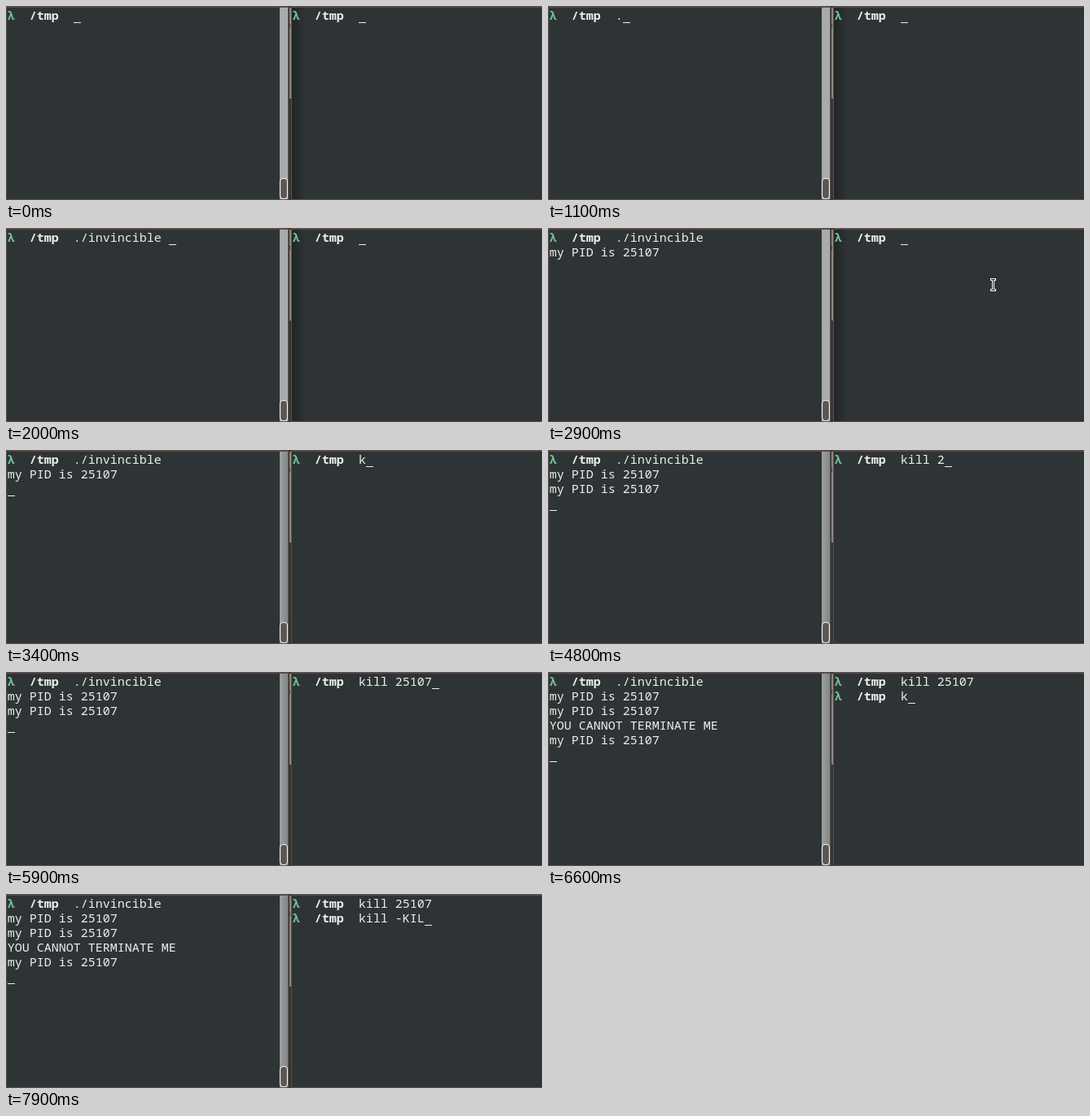
These frames come from a looping animation (658 px wide and 239 px high, 8 s). An HTML page:

```html
<!DOCTYPE html>
<html lang="en">
<head>
<meta charset="utf-8">
<title>Two terminals</title>
<style>
html, body { margin: 0; width: 100%; height: 100%; overflow: hidden; background: #2e3436; }
svg { display: block; }
text { font: 15px "Noto Sans Mono", "DejaVu Sans Mono", monospace; fill: #eeeeec; white-space: pre; }
.bold { font-weight: 700; }
.sign { fill: #73c48f; }
</style>
</head>
<body>
<svg width="658" height="239" viewBox="0 0 658 239">
  <defs>
    <linearGradient id="toRight"><stop stop-opacity=".3"/><stop offset="1" stop-opacity="0"/></linearGradient>
    <linearGradient id="toLeft"><stop stop-color="#1c282c" stop-opacity="0"/><stop offset="1" stop-color="#1c282c" stop-opacity=".3"/></linearGradient>
  </defs>
  <rect width="658" height="239" fill="#2e3436"/>
  <rect x="336" y="2" width="10" height="236" fill="#a8abab"/>
  <rect id="leftShade" x="332" y="2" width="15" height="236" fill="url(#toLeft)"/>
  <rect id="rightShade" x="351" y="2" width="17" height="236" fill="url(#toRight)"/>
  <rect x="336.5" y="212.5" width="9" height="25" rx="4" fill="#5e5653" stroke="#f2f2f0" stroke-width="1.2"/>
  <rect x="346" width="5" height="239" fill="#363534"/>
  <rect x="348" y="2" width="2" height="112" fill="#8f8581"/>
  <rect x="348" y="22" width="1" height="5" fill="#5a5350"/>
  <path d="M0 1H347M350 1H658" stroke="#5a4c48" stroke-width="2"/>
  <path d="M.5 0V239M346.5 0V239M350.5 0V239M0 238.5H347M350 238.5H658" stroke="#5a4f4b"/>
  <g id="left" transform="translate(2)"></g>
  <g id="right" transform="translate(352)"></g>
  <g id="pointer" fill="none">
    <path d="M-3.5-6.5H3.5M-3.5 6.5H3.5M0-6V6" stroke="#fff" stroke-width="3"/>
    <path d="M-2.5-6.5H2.5M-2.5 6.5H2.5M0-6V6" stroke="#222"/>
  </g>
</svg>
<script>
const LOOP = 8000, STEP = 100, CELL = 9, ROW = 18, BLINK = 600;
const FOCUS = 3000, KILLED = 6000;
const $ = id => document.getElementById(id);

// Each entry: time of a key press and the command line after it
const run = [[0, ""], [1000, "."], [1200, "./"], [1400, "./i"], [1500, "./in"], [1800, "./invincible "]];
const enter = 2100;
const kill = [[0, ""], [3300, "k"], [3700, "ki"], [3800, "kil"], [3900, "kill"], [4100, "kill "],
  [4400, "kill 2"], [4900, "kill 25"], [5200, "kill 251"], [5500, "kill 2510"], [5700, "kill 25107"]];
const force = [[KILLED, ""], [6400, "k"], [6800, "ki"], [6900, "kil"], [7100, "kill"], [7200, "kill "],
  [7400, "kill -"], [7600, "kill -K"], [7700, "kill -KI"], [7900, "kill -KIL"]];
const output = [[enter, "my PID is 25107"], [4000, "my PID is 25107"],
  [KILLED, "YOU CANNOT TERMINATE ME"], [KILLED, "my PID is 25107"]];

const until = (list, t) => list.filter(([at]) => at <= t);
const typed = (keys, t) => "λ  /tmp  " + until(keys, t).pop()[1];

function draw(id, lines, cursorOn) {
  const rows = lines.map((line, i) => {
    const body = line.replace(/^(λ)(  \/tmp)/,
      '<tspan class="bold sign">$1</tspan><tspan class="bold">$2</tspan>');
    return `<text x="-.25" y="${17 + i * ROW}">${body}</text>`;
  });
  const last = lines.length - 1;
  if (cursorOn) rows.push(`<rect x="${lines[last].length * CELL}" y="${20 + last * ROW}" width="${CELL}" height="1" fill="#eeeeec"/>`);
  $(id).innerHTML = rows.join("");
}

function render(t) {
  const rightFocus = t >= FOCUS;
  const presses = [...run, [enter], ...kill.slice(1), ...force, [FOCUS]]
    .map(([at]) => at).filter(at => at <= t);
  const lit = (t - Math.max(...presses)) % (2 * BLINK) < BLINK;

  const leftLines = [typed(run, t)];
  if (t >= enter) leftLines.push(...until(output, t).map(([, text]) => text), "");
  const rightLines = [typed(kill, t)];
  if (t >= KILLED) rightLines.push(typed(force, t));
  draw("left", leftLines, rightFocus || lit);
  draw("right", rightLines, !rightFocus || lit);

  $("leftShade").style.display = rightFocus ? "" : "none";
  $("rightShade").style.display = rightFocus ? "none" : "";

  const p = Math.min(1, (t - 2500) / 400);
  $("pointer").style.display = t >= 2500 && t < 3300 ? "" : "none";
  $("pointer").setAttribute("transform", `translate(${366.5 + 180 * p} ${74 - 4 * p})`);
}

let shown = -1;
const start = performance.now();
function tick() {
  const t = Math.floor((performance.now() - start) % LOOP / STEP) * STEP;
  if (t !== shown) render(shown = t);
  requestAnimationFrame(tick);
}
tick();
</script>
</body>
</html>
```
